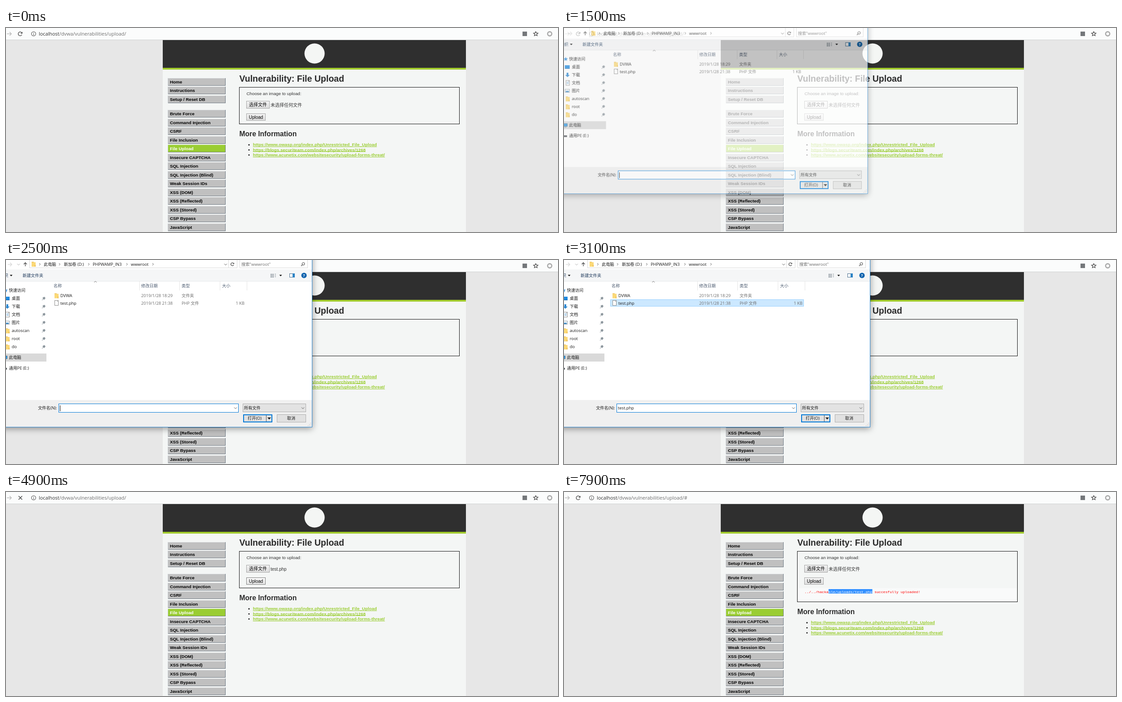
An HTML page with a canvas for the animation above (8 s loop, 1229 px wide and 456 px high).

```html
<!DOCTYPE html>
<html lang="zh">
<head>
<meta charset="utf-8">
<title>File upload</title>
<style>
html, body { margin: 0; width: 100%; height: 100%; overflow: hidden; background: #e7e7e7; }
canvas { display: block; }
</style>
</head>
<body>
<canvas id="stage" width="1229" height="456"></canvas>
<script>
const LOOP = 8000;
const CJK = '"Noto Sans CJK SC", "Noto Sans CJK JP", "Noto Sans CJK", sans-serif';
const ARIAL = '"Liberation Sans", ' + CJK;
const UI = '"Open Sans", ' + CJK;
const MONO = '"Liberation Mono", monospace';
const LIME = '#9acd32', INK = '#1a1a1a', GREY = '#6d6d6d', BLUE = '#0078d7';

const stage = document.getElementById('stage').getContext('2d');
const layer = document.createElement('canvas');
const PAD_X = 50, PAD_Y = 40;
layer.width = 800;
layer.height = 460;
const layerCtx = layer.getContext('2d');
let c = stage;

// ---- helpers ----
function rect(x, y, w, h, fill, stroke) {
  if (fill) { c.fillStyle = fill; c.fillRect(x, y, w, h); }
  if (stroke) { c.strokeStyle = stroke; c.lineWidth = 1; c.strokeRect(x + .5, y + .5, w - 1, h - 1); }
}

// y is the middle of the capitals
function text(s, x, y, size, color, font = UI, weight = 400, align = 'left') {
  c.font = `${weight} ${size}px ${font}`;
  c.textAlign = align;
  c.fillStyle = color;
  c.fillText(s, x, y + size * .36);
  return c.measureText(s).width;
}

function path(points, color, width = 1, closed = false) {
  c.beginPath();
  points.forEach(([x, y], i) => i ? c.lineTo(x, y) : c.moveTo(x, y));
  if (closed) { c.closePath(); c.fillStyle = color; c.fill(); return; }
  c.strokeStyle = color;
  c.lineWidth = width;
  c.stroke();
}

function arc(x, y, r, color, width, from = 0, to = Math.PI * 2) {
  c.beginPath();
  c.arc(x, y, r, from, to);
  if (width) { c.strokeStyle = color; c.lineWidth = width; c.stroke(); }
  else { c.fillStyle = color; c.fill(); }
}

const chevronDown = (x, y, color = '#555') => path([[x - 3, y - 1.5], [x, y + 1.5], [x + 3, y - 1.5]], color);
const chevronRight = (x, y) => path([[x - 1, y - 2.5], [x + 1.5, y], [x - 1, y + 2.5]], '#555');
const caretDown = (x, y, r = 3) => path([[x - r, y - r / 2], [x + r, y - r / 2], [x, y + r / 2 + .5]], INK, 0, true);

function reload(x, y, r, color) {
  arc(x, y, r, color, 1.3, .5, 5.6);
  path([[x + r + .8, y - r - .3], [x + r + .8, y - .4], [x + .6, y - .4]], color, 0, true);
}

function star(x, y, r, color, filled) {
  const pts = [];
  for (let i = 0; i <= 10; i++) {
    const a = -Math.PI / 2 + i * Math.PI / 5, d = i % 2 ? r * .45 : r;
    pts.push([x + d * Math.cos(a), y + d * Math.sin(a)]);
  }
  path(pts, color, 1.2, filled);
}

function arrow(x, y, w, color) {
  path([[x, y], [x + w, y]], color, 1.3);
  path([[x + w - 4, y - 4], [x + w, y], [x + w - 4, y + 4]], color, 1.3);
}

// ---- web page ----
const MENU = ['Home', 'Instructions', 'Setup / Reset DB', 'Brute Force', 'Command Injection', 'CSRF',
  'File Inclusion', 'File Upload', 'Insecure CAPTCHA', 'SQL Injection', 'SQL Injection (Blind)',
  'Weak Session IDs', 'XSS (DOM)', 'XSS (Reflected)', 'XSS (Stored)', 'CSP Bypass', 'JavaScript'];
const LINKS = ['https://www.owasp.org/index.php/Unrestricted_File_Upload',
  'https://blogs.securiteam.com/index.php/archives/1268',
  'https://www.acunetix.com/websitesecurity/upload-forms-threat/'];
const MESSAGE = '../../hackable/uploads/test.php succesfully uploaded!';
const PATH_END = 31, CHAR = 4.875;

function addressBar(t) {
  rect(0, 0, 1229, 26, '#fbfcfc');
  rect(0, 26, 1229, 1, '#cfd1d1');
  arrow(2, 13, 10, '#b4b4b4');
  if (t >= 4900 && t < 5500) {
    path([[28, 9], [36, 17]], '#444', 1.4);
    path([[36, 9], [28, 17]], '#444', 1.4);
  } else reload(31.5, 13, 4.3, '#444');
  arc(61.5, 13, 4.8, '#555', 1.1);
  rect(61, 12, 1, 4, '#555');
  rect(61, 10, 1, 1, '#555');
  const w = text('localhost', 73, 13, 10.9, '#333');
  text('/dvwa/vulnerabilities/upload/' + (t >= 5300 ? '#' : ''), 73 + w, 13, 10.9, '#707070');
  if (t < 5300 || t >= 5500) rect(1150, 8, 10, 10, '#74777a');
  star(1179.5, 13, 5.3, '#444');
  arc(1210.5, 13, 4.6, '#a9a9a9', 2.6);
}

function menu() {
  MENU.forEach((label, i) => {
    const y = 120.2 + 19.5 * i + (i > 2 ? 13 : 0);
    const top = Math.round(y - 8.4), on = label === 'File Upload';
    rect(361, top, 128, 17, on ? LIME : '#c0c0c0');
    rect(361, top, 127, 1, on ? '#a9d65a' : '#d2d4d6');
    rect(360, top, 1, 17, '#cdd2d6');
    rect(361, top + 16, 128, 1, '#707a84');
    rect(488, top, 1, 17, '#707a84');
    text(label, 365, y, 9.75, on ? '#fff' : '#000', ARIAL, 700);
  });
}

function button(label, x, y, w, h, state) {
  const [top, bottom, edge] = {
    idle: ['#f5f5f5', '#dcdcdc', '#a3a3a3'],
    hover: ['#fbfbfb', '#e6e6e6', '#7c7c7c'],
    down: ['#d4d4d4', '#e4e4e4', '#7c7c7c']
  }[state];
  const g = c.createLinearGradient(0, y, 0, y + h);
  g.addColorStop(0, top);
  g.addColorStop(1, bottom);
  rect(x, y, w, h, g, edge);
  text(label, x + w / 2, y + h / 2, 10, '#000', ARIAL, 400, 'center');
}

function chooseState(t) {
  if (t >= 1300 && t < 1500) return 'down';
  return t >= 800 && t < 3400 ? 'hover' : 'idle';
}

function uploadState(t) {
  if (t === 4800) return 'down';
  return t >= 4400 && t < 5700 ? 'hover' : 'idle';
}

function tooltip(t) {
  if (t < 1100 || t >= 1300) return;
  c.globalAlpha = t < 1200 ? .5 : 1;
  rect(580, 185, 72, 16, '#fff', '#8a8a8a');
  text('未选择任何文件', 616, 193, 9, '#575757', UI, 400, 'center');
  c.globalAlpha = 1;
}

function message(t) {
  const x = 535.4, y = 222.6, size = CHAR / .6;
  rect(521, 215, 487, 30, '#f9fafa');
  text(MESSAGE, x, y, size, '#f00', MONO);
  if (t < 7200) return;
  const n = Math.round((t - 7100) / 100 * 2.5);
  const left = x + (PATH_END - n) * CHAR;
  rect(left, 217, n * CHAR, 10, '#3390ff');
  text(MESSAGE.slice(PATH_END - n, PATH_END), left, y, size, '#fff', MONO);
}

function page(t) {
  const done = t >= 5500, shift = done ? 31 : 0;
  rect(0, 0, 1229, 456, '#e7e7e7');
  rect(349, 27, 675, 429, '#f4f6f5');
  rect(349, 27, 675, 62, '#2f2f2f');
  rect(349, 89, 675, 4, '#a2cb2d');
  arc(687, 57, 22.5, '#f4f6f4');
  addressBar(t);
  menu();
  text('Vulnerability: File Upload', 519.5, 113, 19.5, '#2b2b2b', ARIAL, 700);
  if (done) message(t);
  rect(519, 132, 491, 83 + shift, null, '#111');
  text('Choose an image to upload:', 535.5, 146, 9.75, '#333', ARIAL);
  button('选择文件', 535, 163, 52, 17, chooseState(t));
  text(t >= 3300 && !done ? 'test.php' : '未选择任何文件', 589, 172, 10, '#333', ARIAL);
  button('Upload', 535, 191, 43, 16, uploadState(t));
  tooltip(t);
  text('More Information', 519.5, 236.3 + shift, 15.65, '#2b2b2b', ARIAL, 700);
  LINKS.forEach((url, i) => {
    const y = 260.7 + shift + 11.3 * i;
    arc(541, y + .5, 1.6, '#222');
    const w = text(url, 549.7, y, 9.75, LIME, ARIAL, 700);
    rect(549.7, Math.round(y + 4.2), w, 1, LIME);
  });
}

// ---- file dialog ----
function folder(x, y) {
  rect(x, y - 5, 5, 3, '#e8b84a');
  rect(x, y - 4, 9, 10, '#fbd978');
  rect(x + 7, y + 2, 2, 4, '#eebf52');
}

function sheet(x, y) {
  rect(x, y - 6, 9, 12, '#fff', '#8c8c8c');
  path([[x + 6, y - 6], [x + 9, y - 3], [x + 6, y - 3]], '#b5b5b5', 0, true);
}

function pin(x, y) {
  path([[x - 4, y + 4], [x - 1, y + 1]], '#7d8890', 1);
  path([[x - 3, y - 1], [x + 1, y + 3], [x + 4, y - 1], [x + 1, y - 4]], '#8b959c', 0, true);
}

function monitor(y) {
  rect(-6, y - 4, 9, 7, '#2f9be8', '#3b6f95');
  rect(-4, y + 4, 5, 1, '#5b7f99');
}

function sidebar() {
  star(-1, 68, 5, '#2f8fe0', true);
  text('快速访问', 6.5, 68, 9.2, INK);
  ['桌面', '下载', '文档', '图片', 'autoscan', 'root', 'do'].forEach((label, i) => {
    const y = 86 + 18 * i;
    if (i === 0) { rect(-3, y - 4, 11, 8, '#1f8ae0'); rect(-3, y + 3, 11, 1, '#0d5fa8'); }
    if (i === 1) {
      rect(1, y - 5, 4, 5, '#2b87d1');
      path([[-2, y], [8, y], [3, y + 5]], '#2b87d1', 0, true);
    }
    if (i === 2) { sheet(-1, y); rect(1, y - 2, 5, 1, '#4a90c8'); rect(1, y + 1, 5, 1, '#4a90c8'); }
    if (i === 3) { rect(-3, y - 4, 11, 8, '#fff', '#8a9aa5'); rect(-1, y, 7, 3, '#4b95cd'); }
    if (i > 3) folder(-1, y);
    text(label, 12.7, y, 9.3, INK);
    pin(84, y);
  });
  rect(-41, 209, 131, 18, '#d9d9d9');
  monitor(218);
  text('此电脑', 6.5, 218, 9.2, INK);
  rect(-6, 241, 8, 4, '#565b60');
  text('通用PE (E:)', 6.5, 242, 9.2, INK);
}

function fileList(t) {
  [297, 386, 476, 536].forEach(x => rect(x, 47, 1, 21, '#e5e5e5'));
  path([[196, 50], [199, 47.5], [202, 50]], '#777');
  [['名称', 106], ['修改日期', 301], ['类型', 391], ['大小', 481]]
    .forEach(([s, x]) => text(s, x, 57.5, 9.2, '#4c5b70'));
  if (t >= 3100) rect(103, 88, 431, 16, '#cce8ff', '#99d1ff');
  else if (t >= 2700) rect(104, 88, 430, 16, '#e5f3ff');
  folder(108, 79.5);
  sheet(108, 96);
  [['DVWA', '18:29', '文件夹', 80], ['test.php', '21:38', 'PHP 文件', 96.3]].forEach(([name, time, type, y]) => {
    text(name, 121, y, 9.3, INK);
    text('2019/1/28 ' + time, 301, y, 9.3, GREY);
    text(type, 391, y, 9.2, GREY);
  });
  text('1 KB', 531, 96.3, 9.3, GREY, UI, 400, 'right');
}

function locationRow() {
  arrow(4, 10, 9, '#d5d5d5');
  chevronDown(28, 10, '#aaa');
  path([[43, 14], [43, 6]], '#444', 1.3);
  path([[39.5, 9.5], [43, 6], [46.5, 9.5]], '#444', 1.3);
  rect(52, -4, 463, 22, '#fff', '#d9d9d9');
  rect(495, -4, 1, 22, '#d9d9d9');
  folder(57, 9);
  [75, 119, 184, 269, 327].forEach(x => chevronRight(x, 9.5));
  [['此电脑', 84], ['新加卷 (D:)', 129], ['PHPWAMP_IN3', 193], ['wwwroot', 278]]
    .forEach(([s, x]) => text(s, x, 9.3, 9.2, INK));
  chevronDown(489, 10);
  reload(504, 9.5, 3.3, '#555');
  rect(520, -4, 152, 22, '#fff', '#d9d9d9');
  text('搜索"wwwroot"', 524, 9.3, 9.2, GREY);
  arc(662, 8.5, 2.8, '#555', 1.1);
  path([[660, 10.5], [657, 13.5]], '#555', 1.3);
}

function commandBar() {
  rect(-41, 21, 722, 26, '#f5f6f7');
  rect(-41, 47, 722, 1, '#e6e8ea');
  text('组织', -13.5, 34.5, 9.2, '#1e395b');
  caretDown(11.5, 34.5);
  text('新建文件夹', 37, 34.5, 9.2, '#1e395b');
  for (let i = 0; i < 3; i++) {
    rect(589, 31 + 3 * i, 3, 2, '#8a949c');
    rect(593, 31 + 3 * i, 3, 2, '#8a949c');
    rect(598, 31 + 3 * i, 3, 1, '#8a949c');
  }
  caretDown(611.5, 34.5);
  rect(631, 30, 12, 9, '#fff', '#4b6f8f');
  rect(638, 30, 5, 9, '#2d83c4');
  arc(663.5, 34.5, 6, '#0a62ad');
  text('?', 663.5, 34.5, 9, '#fff', UI, 700, 'center');
}

function footer(t) {
  rect(-41, 313, 722, 60, '#f0f0f0');
  text('文件名(N):', 113.5, 330.5, 9.2, INK, UI, 400, 'right');
  rect(117, 321, 401, 20, '#fff', BLUE);
  if (t >= 3100) text('test.php', 120, 331, 9.3, INK);
  else if (t < 2000 || (t >= 2500 && t < 2900)) rect(120, 325, 1, 13, '#000');
  chevronDown(511, 331);
  rect(527, 321, 141, 19, '#e3e3e3', '#adadad');
  text('所有文件', 530, 330.5, 9.2, INK);
  chevronDown(661, 331);
  rect(528, 345, 65, 18, '#e1e1e1', BLUE);
  rect(529, 346, 63, 16, null, BLUE);
  rect(579, 347, 1, 14, '#555');
  text('打开(O)', 553.5, 354, 9.2, INK, UI, 400, 'center');
  caretDown(586, 354, 4);
  rect(603, 345, 65, 18, '#e1e1e1', '#adadad');
  text('取消', 635, 354, 9.2, INK, UI, 400, 'center');
  for (let i = 0; i < 3; i++)
    for (let j = 0; j <= i; j++) rect(678 - 3 * j, 365 + 3 * i - 1, 1, 1, '#a5a5a5');
}

function drawDialog(t) {
  c = layerCtx;
  c.setTransform(1, 0, 0, 1, 0, 0);
  c.clearRect(0, 0, layer.width, layer.height);
  c.translate(PAD_X, PAD_Y);
  c.shadowColor = 'rgba(0,0,0,.4)';
  c.shadowBlur = 14;
  c.shadowOffsetY = 3;
  rect(-41, -30, 723, 404, '#fff');
  c.shadowColor = 'transparent';
  locationRow();
  commandBar();
  sidebar();
  fileList(t);
  footer(t);
  rect(-41, -30, 723, 404, null, '#2a86d0');
  c = stage;
}

function dialog(t) {
  if (t < 1500 || t >= 3400) return;
  let alpha = 1, scale = 1;
  if (t < 1600) [alpha, scale] = [.71, .985];
  else if (t < 1700) [alpha, scale] = [.95, .997];
  else if (t >= 3300) [alpha, scale] = [.4, .97];
  drawDialog(t);
  c.save();
  c.globalAlpha = alpha;
  c.translate(320, 165);
  c.scale(scale, scale);
  c.drawImage(layer, -320 - PAD_X, -165 - PAD_Y);
  c.restore();
}

const start = performance.now();
function frame() {
  const t = Math.floor((performance.now() - start) % LOOP / 100) * 100;
  page(t);
  dialog(t);
  requestAnimationFrame(frame);
}
frame();
</script>
</body>
</html>
```
